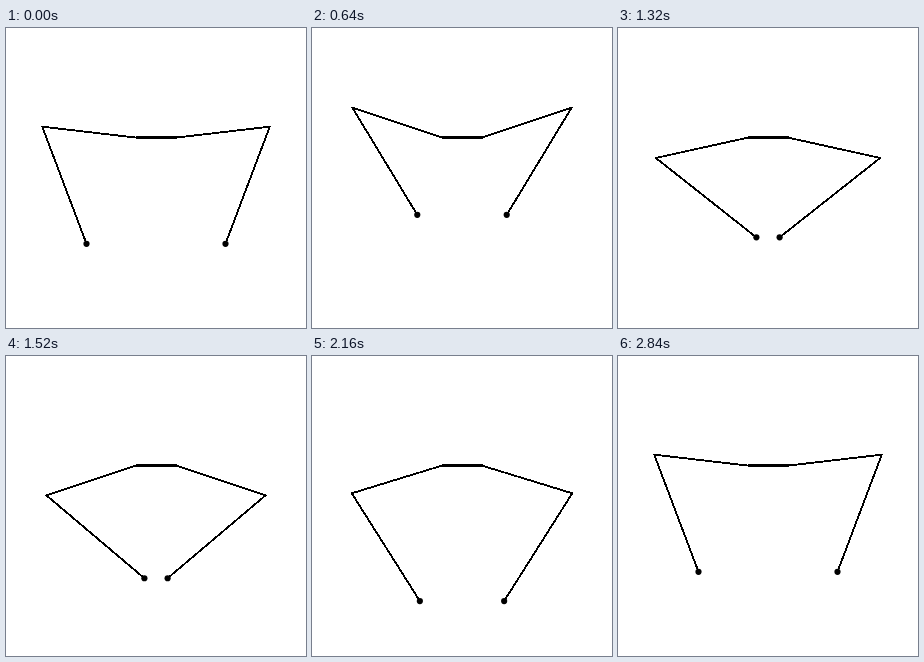
An HTML page without scripts for the animation above (2.88 s loop, 300 px wide and 300 px high).

```html
<!DOCTYPE html>
<html lang="en">
<head>
<meta charset="utf-8">
<title>Two-link arms</title>
<style>
  @property --t {
    syntax: "<angle>";
    inherits: true;
    initial-value: 0deg;
  }
  html, body { margin: 0; width: 100%; height: 100%; overflow: hidden; background: #fff; }
  svg { display: block; width: 100%; height: 100%; }

  /* All positions are measured from the shoulder. */
  .rig {
    --upper: 94.4;
    --fore: 126.5;

    /* the hand runs round a circle */
    --hx: calc(20.2 + 29.3 * cos(var(--t)));
    --hy: calc(106.2 - 29.3 * sin(var(--t)));

    /* the elbow follows a slightly smaller, later circle, so the forearm gives a little */
    --lag: calc(var(--t) - 1.5deg);
    --x: calc(20.2 + 27.6 * cos(var(--lag)));
    --y: calc(106.2 - 27.6 * sin(var(--lag)));
    --dist: hypot(var(--x), var(--y));
    --lift: acos((var(--upper) * var(--upper) + var(--dist) * var(--dist) - var(--fore) * var(--fore))
      / (2 * var(--upper) * var(--dist)));
    --swing: calc(atan2(var(--y), var(--x)) - var(--lift));
    --ex: calc(var(--upper) * cos(var(--swing)));
    --ey: calc(var(--upper) * sin(var(--swing)));
    --fx: calc(var(--hx) - var(--ex));
    --fy: calc(var(--hy) - var(--ey));

    stroke: #000;
    stroke-width: 1.9;
    stroke-linecap: round;
    animation: turn 2880ms steps(72, end) infinite;
  }
  path { shape-rendering: crispEdges; vector-effect: non-scaling-stroke; }
  .upper { transform: rotate(var(--swing)); }
  .fore {
    transform: translate(calc(var(--ex) * 1px), calc(var(--ey) * 1px))
      rotate(atan2(var(--fy), var(--fx)))
      scale(hypot(var(--fx), var(--fy)), 1);
  }
  .hand {
    stroke: none;
    transform: translate(calc(var(--hx) * 1px), calc(var(--hy) * 1px));
  }
  .base { stroke-width: 3; stroke-linecap: butt; }

  /* 71 steps make a full turn, and the first pose is held twice. */
  @keyframes turn {
    from { --t: 0deg; }
    to { --t: calc(360deg * 72 / 71); }
  }
</style>
</head>
<body>
<svg viewBox="0 0 300 300">
  <g class="rig">
    <g id="arm">
      <g transform="translate(170 109.6)">
        <path class="upper" d="M0 0H94.4"/>
        <path class="fore" d="M0 0H1"/>
        <circle class="hand" r="3.1"/>
      </g>
    </g>
    <use href="#arm" transform="translate(300 0) scale(-1 1)"/>
    <path class="base" d="M130 109.5H170.5"/>
  </g>
</svg>
</body>
</html>
```
